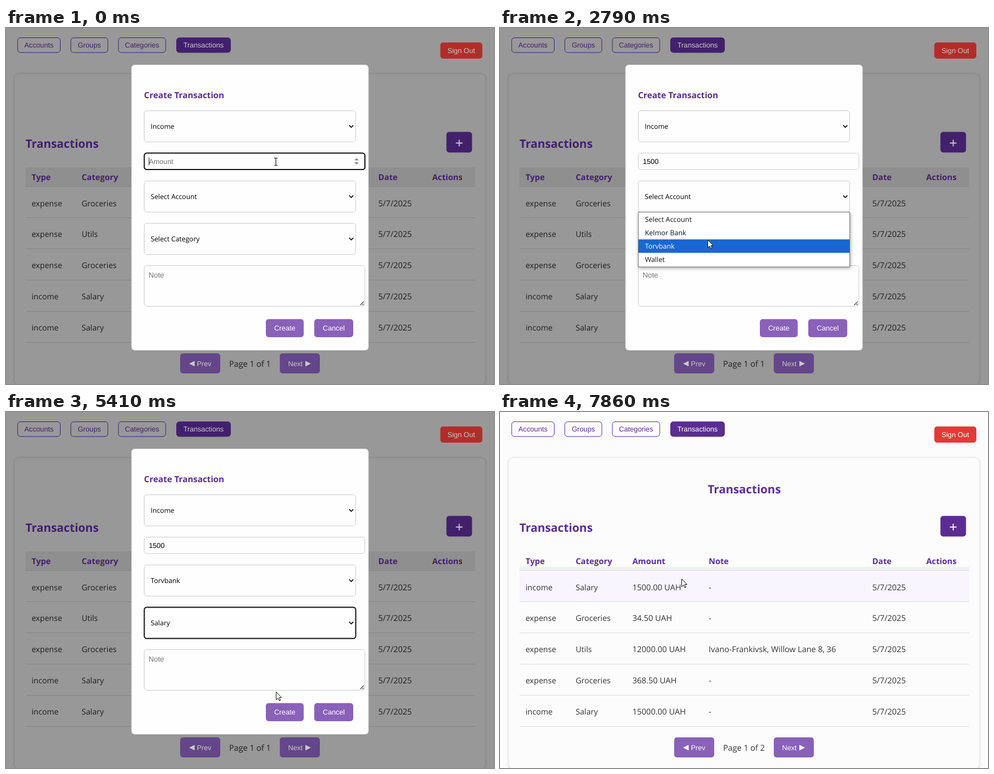
Recreate the animation shown at these times as an HTML page. Size 877 px wide and 639 px high, loop 7990 ms.

```html
<!DOCTYPE html>
<html lang="en">
<head>
<meta charset="utf-8">
<title>Create transaction</title>
<style>
  html, body { margin: 0; width: 100%; height: 100%; overflow: hidden; }
  svg {
    display: block; width: 877px; height: 639px; text-rendering: geometricPrecision;
    --page: #fcfcfc; --line: #ddd; --edge: #ececec; --head: #fcfcfc; --ink: #333;
    --purple: #5c2d91; --violet: #8a61b8; --red: #e53935; --light: #fff;
    background: var(--page);
  }
  svg.dim {
    --page: #989898; --line: #858585; --edge: #8b8b8b; --head: #8f8f8f; --ink: #1f1f1f;
    --purple: #43206c; --violet: #64468a; --red: #b22d2a; --light: #c8c8c8;
  }
  .ui { font-family: "Open Sans", "Noto Sans", sans-serif; }
  .arial { font-family: "Liberation Sans", Arial, sans-serif; }
  .bold { font-weight: 700; }
  .mid { text-anchor: middle; }
  .card { filter: drop-shadow(0 1px 2px rgba(0, 0, 0, .16)); }
  .popup { filter: drop-shadow(1px 2px 3px rgba(0, 0, 0, .35)); }
</style>
</head>
<body>
<svg id="stage" viewBox="0 0 877 639"></svg>
<script>
const LOOP = 7990;
const stage = document.getElementById('stage');
const WHITE = '#fefefe', PURPLE = '#5c2d91', VIOLET = '#8a61b8';

const ROWS = [
  ['income', 'Salary', '1500.00 UAH', '-'],
  ['expense', 'Groceries', '34.50 UAH', '-'],
  ['expense', 'Utils', '12000.00 UAH', 'Ivano-Frankivsk, Willow Lane 8, 36'],
  ['expense', 'Groceries', '368.50 UAH', '-'],
  ['income', 'Salary', '15000.00 UAH', '-'],
  ['income', 'Salary', '10000.00 UAH', 'Company Name'],
];
const COLUMNS = [['Type', 46], ['Category', 136], ['Amount', 238], ['Note', 375], ['Date', 669], ['Actions', 766]];

const SELECTS = {
  account: { top: 274, options: ['Select Account', 'Kelmor Bank', 'Torvbank', 'Wallet'] },
  category: { top: 350, options: ['Select Category', 'Utils', 'Rent', 'Groceries', 'Salary', 'Cashback'] },
};
const ROW_HEIGHT = 24.2;

// Each entry changes part of the state from its time on.
const STEPS = [
  [0, { amount: '', caret: true, focus: 'amount', open: '', account: 0, category: 0, modal: true, saved: false }],
  [542, { caret: false }],
  [960, { amount: '1', caret: true }],
  [1100, { amount: '15' }],
  [1240, { amount: '150' }],
  [1380, { amount: '1500' }],
  [2120, { caret: false, focus: '', open: 'account' }],
  [3180, { focus: 'account', open: '', account: 2 }],
  [3690, { focus: '', open: 'category' }],
  [4830, { focus: 'category', open: '', category: 4 }],
  [6000, { focus: '' }],
  [6130, { modal: false }],
  [6400, { saved: true }],
];

// Pointer moves: start, end, number of jumps, way points.
const MOVES = [
  [130, 680, 5, [[485, 240], [490, 269], [465, 251]]],
  [1980, 2260, 3, [[465, 251], [430, 300]]],
  [2530, 2790, 3, [[430, 300], [373, 380]]],
  [2920, 3570, 6, [[373, 380], [371, 392], [368, 381]]],
  [3690, 4680, 8, [[368, 381], [349, 527]]],
  [4830, 5410, 5, [[349, 527], [485, 502]]],
  [5560, 5860, 3, [[485, 502], [504, 538]]],
  [7130, 7860, 6, [[504, 538], [712, 400], [560, 290], [218, 282], [326, 299]]],
];

function pointerAt(t) {
  const move = MOVES.filter(m => m[0] <= t).pop();
  if (!move) return MOVES[0][3][0];
  const [start, end, count, points] = move;
  const jump = Math.min(count, Math.floor((t - start) / (end - start) * (count - 1) + 1e-6) + 1);
  const at = jump / count * (points.length - 1);
  const i = Math.min(Math.floor(at), points.length - 2);
  return [0, 1].map(k => Math.round(points[i][k] + (points[i + 1][k] - points[i][k]) * (at - i)));
}

const text = (s, x, y, size, fill, cls = 'ui') =>
  `<text x="${x}" y="${y}" font-size="${size}" fill="${fill}" class="${cls}">${s}</text>`;
const rect = (x, y, w, h, fill, extra = '') =>
  `<rect x="${x}" y="${y}" width="${w}" height="${h}" fill="${fill}" ${extra}/>`;
const path = (d, extra) => `<path d="${d}" ${extra}/>`;
const button = (label, x, y, w, h, fill, color, extra = '') =>
  rect(x, y, w, h, fill, `rx="5" ${extra}`) +
  text(label, x + w / 2, y + h / 2 + 4.6, 12.73, color, 'arial mid');
const field = (x, y, w, h, focused) => focused
  ? rect(x + .5, y + .5, w - 1, h - 1, WHITE, 'rx="4.5" stroke="#101010" stroke-width="2"')
  : rect(x + .5, y + .5, w - 1, h - 1, WHITE, 'rx="4.5" stroke="#ccc"');

function tab(label, x, w, active) {
  return button(label, x, 17.5, w, 26.5, active ? 'var(--purple)' : 'none',
    active ? 'var(--light)' : 'var(--purple)', 'stroke="var(--purple)"');
}

function table(saved) {
  const rows = saved ? ROWS.slice(0, 5) : ROWS.slice(1);
  let out = rect(35, 250, 808, 35, 'var(--head)');
  if (saved) out += rect(35, 278, 808, 6.5, '#f1f1f1') + rect(35, 285, 808, 55.5, '#f8f5fe');
  out += COLUMNS.map(([name, x]) => text(name, x, 273, 14.65, 'var(--purple)', 'ui bold')).join('');
  for (let i = 0; i < 6; i++) out += rect(35, Math.round(284 + i * 56), 808, 1, 'var(--line)');
  rows.forEach((row, i) => {
    [...row, '5/7/2025'].forEach((cell, c) => {
      out += text(cell, COLUMNS[c][1], 319.5 + i * 55.8, c < 2 ? 14.1 : 14.5, 'var(--ink)');
    });
  });
  return out;
}

function page(s) {
  return tab('Accounts', 21, 76.5) + tab('Groups', 116.5, 66.5) +
    tab('Categories', 202, 85) + tab('Transactions', 306.5, 97, true) +
    button('Sign Out', 780.5, 26, 75.5, 29, 'var(--red)', 'var(--light)') +
    rect(15.5, 82, 846, 559, 'var(--page)', 'rx="9" stroke="var(--edge)" class="card"') +
    text('Transactions', 439, 146, 20.7, 'var(--purple)', 'ui bold mid') +
    text('Transactions', 35, 215, 20.7, 'var(--purple)', 'ui bold') +
    rect(791.5, 186.5, 46, 37, 'var(--purple)', 'rx="5"') +
    path('M808.5 206.5h12M814.5 200.5v12', 'stroke="var(--light)" stroke-width="1.8"') +
    table(s.saved) +
    rect(313, 584, 72, 36, 'var(--violet)', 'rx="5"') +
    path('M329 602.500l10-5v10z', 'fill="var(--light)"') +
    text('Prev', 343, 607, 12.73, 'var(--light)', 'arial') +
    text('Page 1 of ' + (s.saved ? 2 : 1), 401, 608, 14.6, 'var(--ink)') +
    rect(492, 584, 72, 36, 'var(--violet)', 'rx="5"') +
    text('Next', 507, 607, 12.73, 'var(--light)', 'arial') +
    path('M548 602.500l-10-5v10z', 'fill="var(--light)"');
}

function select(label, top, focused) {
  return field(248, top, 381, 57, focused) + text(label, 260, top + 33.3, 12.25, '#000') +
    path(`M616.8 ${top + 26.6}l3.700 3.700l3.700-3.700`, 'fill="none" stroke="#111" stroke-width="1.800"');
}

function popup({ top, options }, y) {
  const first = top + 57;
  const current = Math.max(0, Math.min(options.length - 1, Math.floor((y - first) / ROW_HEIGHT)));
  return rect(248.5, first - .5, 380, options.length * ROW_HEIGHT + 1.5, '#fff', 'stroke="#777" class="popup"') +
    rect(249, first + current * ROW_HEIGHT, 379.5, ROW_HEIGHT, '#1967d2') +
    options.map((o, i) => text(o, 260.5, first + 16.8 + i * ROW_HEIGHT, 12.4, i === current ? '#fff' : '#111')).join('');
}

function modal(s) {
  const amountFocused = s.focus === 'amount';
  let out = rect(225.5, 66, 426, 512.5, WHITE, 'rx="6"') +
    text('Create Transaction', 248, 126, 15.33, PURPLE, 'ui bold') +
    select('Income', 148, false) +
    field(248, 224, 397.5, 30.5, amountFocused) +
    text(s.amount || 'Amount', 256.7, 243.6, 12.73, s.amount ? '#000' : '#757575', 'arial');
  if (s.caret) out += rect(256.5 + s.amount.length * 7.08, 232.5, 1, 14, '#000');
  if (amountFocused) out += path('M626 237.500l4-4 4 4zM626 241l4 4 4-4z', 'fill="#858585"');
  for (const [name, box] of Object.entries(SELECTS))
    out += select(box.options[s[name]], box.top, s.focus === name);
  out += field(248, 426, 397.5, 74) + text('Note', 256.3, 448, 13.2, '#757575', 'arial') +
    path('M636.500 497.500l6.500-6.500M640.500 497.500l2.500-2.500', 'stroke="#444" stroke-width="1.200"') +
    button('Create', 467, 522.5, 68, 32.5, VIOLET, '#fff') +
    button('Cancel', 554, 522.5, 70, 32.5, VIOLET, '#fff');
  return out + (s.open ? popup(SELECTS[s.open], s.y) : '');
}

const CURSORS = {
  arrow: path('M.5.5V14.500L3.800 11.400 6 16.200 8.200 15.200 6 10.600H10.200Z', 'fill="#fff" stroke="#111"'),
  beam: path('M-3-6.500H3M0-6.500V6.500M-3 6.500H3', 'fill="none" stroke="#111" stroke-width="1.200"'),
  hand: path('M-1.500 1.500Q0-1 1.500 1.500V7L7 8Q9 8.500 8.500 11L7.500 17H0L-5 11Q-5 8.500-1.500 11Z',
    'fill="#fff" stroke="#111"'),
};

function cursorKind({ modal, open, x, y }) {
  if (!modal || open) return 'arrow';
  const inside = (l, t, r, b) => x >= l && x <= r && y >= t && y <= b;
  if (inside(248, 224, 645, 254) || inside(248, 426, 645, 500)) return 'beam';
  return inside(467, 522, 535, 555) ? 'hand' : 'arrow';
}

let shown = '';
function draw() {
  const t = performance.now() % LOOP;
  const s = Object.assign({}, ...STEPS.filter(step => step[0] <= t).map(step => step[1]));
  [s.x, s.y] = pointerAt(t);
  const key = JSON.stringify(s);
  if (key !== shown) {
    shown = key;
    stage.classList.toggle('dim', s.modal);
    stage.innerHTML = page(s) + (s.modal ? modal(s) : '') +
      `<g transform="translate(${s.x} ${s.y})">${CURSORS[cursorKind(s)]}</g>`;
  }
  requestAnimationFrame(draw);
}
draw();
</script>
</body>
</html>
```
